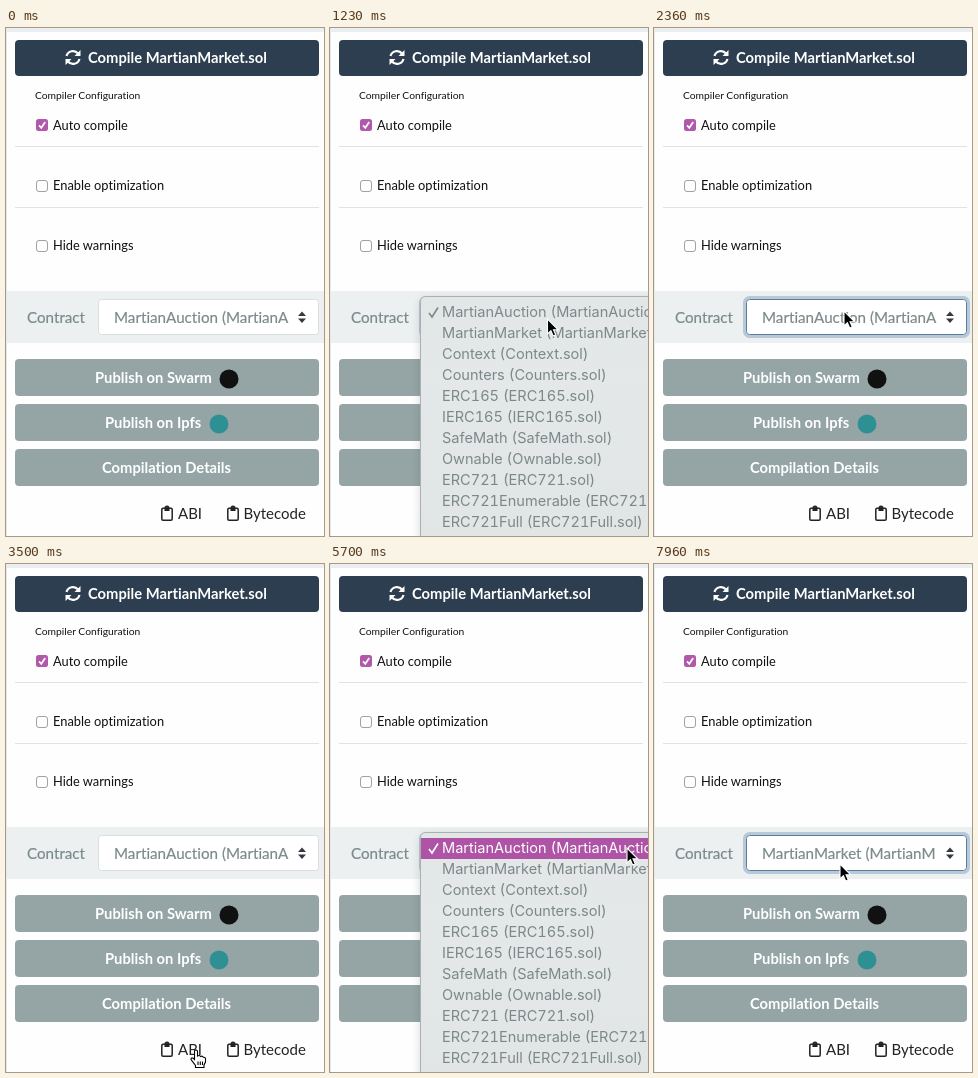
Animation, 318 px wide and 508 px high, one loop 8000 ms. Source, as an HTML page:

```html
<!DOCTYPE html>
<html lang="en">
<head>
<meta charset="utf-8">
<style>
html, body { margin: 0; width: 100%; height: 100%; overflow: hidden; background: #fefefe; }
svg { display: block; width: 318px; height: 508px; font: 15px Lato, sans-serif; font-variant-ligatures: none; }
.btn { fill: #95a5a6; }
.white { fill: #fff; font-weight: bold; font-size: 14.75px; }
.small { font-size: 12.85px; fill: #111; }
.grey { fill: #7b8a8b; font-size: 15.2px; stroke: #7b8a8b; stroke-width: .2; }
.dark { fill: #222; }
.box { fill: #fff; stroke: #a0a0a0; }
.line { fill: none; stroke: #222; stroke-width: 1.5; }
#menu text { font: 14.55px Inter, sans-serif; font-variant-numeric: tabular-nums; fill: #7c8889; }
#menu text.on { fill: #fff; }
</style>
</head>
<body>
<svg viewBox="0 0 318 508">
  <defs>
    <linearGradient id="glass" x2="0" y2="1">
      <stop stop-color="#e3e6e7"/><stop offset=".25" stop-color="#e4e8e8"/><stop offset="1" stop-color="#e2e4e4"/>
    </linearGradient>
    <filter id="shadow"><feDropShadow dx="0" dy="3" stdDeviation="4" flood-opacity=".15"/></filter>
    <g id="clip" class="line">
      <rect x=".8" y="2.8" width="10.4" height="12" rx="1.2"/>
      <path d="M3.5 4.5h5M4.5 2.5a1.5 1.5 0 0 1 3 0" stroke-width="2"/>
    </g>
  </defs>

  <path d="M0 0H318V4H0Z" fill="#eceff1"/>
  <path d="M.5 0V508" stroke="#e6e9eb"/>
  <rect x="9" y="12" width="304" height="36" rx="4" fill="#2c3e50"/>
  <path d="M60.5 28A6.6 6.6 0 0 1 72 25.5M73.5 31A6.6 6.6 0 0 1 62 33.5" fill="none" stroke="#fff" stroke-width="2.200"/>
  <path d="M74.500 22V28H68.500ZM59.500 37V31H65.500Z" fill="#fff"/>
  <text class="white" x="82" y="35">Compile MartianMarket.sol</text>
  <text x="29" y="71" font-size="10.3" fill="#111">Compiler Configuration</text>

  <rect x="30" y="91" width="12" height="12" rx="2.5" fill="#b258aa"/>
  <path d="M33 97.300L35.300 99.800L39.200 94" fill="none" stroke="#fff" stroke-width="1.7"/>
  <rect class="box" x="30.500" y="152.500" width="11" height="11" rx="2.5"/>
  <rect class="box" x="30.500" y="212.500" width="11" height="11" rx="2.5"/>
  <text class="small" x="47" y="102">Auto compile</text>
  <text class="small" x="47" y="162">Enable optimization</text>
  <text class="small" x="47" y="222">Hide warnings</text>
  <path d="M9 118.500H313M9 179.500H313" stroke="#e2e2e2"/>

  <rect x="1" y="263" width="317" height="52" fill="#ecf0f1"/>
  <text class="grey" x="21" y="295">Contract</text>
  <rect id="ring" x="90.500" y="269.500" width="224" height="39" rx="5" fill="none" stroke="#b9c8d6" stroke-width="3"/>
  <rect id="field" x="92.500" y="271.500" width="220" height="35" rx="3" fill="#fff"/>
  <text id="value" class="grey" x="108" y="295"></text>
  <path d="M292 288L296 283.500L300 288ZM292 290.500L296 295L300 290.500Z" fill="#343a40"/>

  <rect class="btn" x="9" y="331" width="304" height="37" rx="4"/>
  <rect class="btn" x="9" y="376" width="304" height="37" rx="4"/>
  <rect class="btn" x="9" y="421" width="304" height="37" rx="4"/>
  <text class="white" x="89" y="355">Publish on Swarm</text>
  <text class="white" x="99" y="400">Publish on Ipfs</text>
  <text class="white" x="96" y="445">Compilation Details</text>
  <circle cx="223" cy="351" r="9.500" fill="#111"/>
  <circle cx="213" cy="396" r="9.500" fill="#2f9094"/>

  <use href="#clip" x="155" y="477.500"/>
  <use href="#clip" x="221" y="477.500"/>
  <text class="dark" x="172" y="491">ABI</text>
  <text class="dark" x="237.500" y="491">Bytecode</text>

  <g id="menu">
    <rect x="90.500" y="268.500" width="300" height="300" rx="5" fill="url(#glass)" stroke="#a9b0b2" filter="url(#shadow)"/>
    <rect id="bar" x="91" width="227" height="21" fill="#ae53a6"/>
    <path id="tick" d="M99 285L102 289L108 279.500" fill="none" stroke-width="1.6"/>
  </g>

  <path id="arrow" d="M0 0V15L3.400 11.800L5.700 17L8.200 15.900L6 10.800H10.700Z" stroke="#fff" stroke-width="1.100"/>
  <path id="hand" d="M-1.500 1Q0-1 1.500 1V6Q3.500 4.800 4.500 6.500Q6.500 5.500 7.300 7.300Q9.500 7 9.500 9V12L8 15V17.500H-.5V15.500L-5 9.500Q-5 7-2.700 8.300L-1.500 9.500ZM2 11.500V15M4.300 11.500V15M6.500 11.500V15" fill="#fff" stroke="#000" stroke-width="1.100"/>
</svg>
<script>
const LOOP = 8000, ROW = 21;
const items = ["MartianAuction (MartianAuction.sol)", "MartianMarket (MartianMarket.sol)",
  "Context (Context.sol)", "Counters (Counters.sol)", "ERC165 (ERC165.sol)", "IERC165 (IERC165.sol)",
  "SafeMath (SafeMath.sol)", "Ownable (Ownable.sol)", "ERC721 (ERC721.sol)",
  "ERC721Enumerable (ERC721Enumerable.sol)", "ERC721Full (ERC721Full.sol)"];
// time, x, y of the pointer tip
const route = [[760, 330, 335], [1080, 217.5, 291], [1350, 217.5, 291], [1800, 190, 283], [2500, 190, 283],
  [3050, 190, 486], [4290, 190, 486], [4430, 121, 440], [4800, 180, 320], [5350, 297, 284], [6350, 297, 284],
  [6950, 189, 304], [7600, 189, 304], [7900, 186, 300], [8000, 186, 300]];
// time, menu open, highlighted row, focus ring
const states = [[0, 0, -1, 0], [1180, 1, -1, 1], [1350, 1, 0, 1], [1960, 0, -1, 1], [3150, 0, -1, 0],
  [5560, 1, 0, 1], [6700, 1, 1, 1], [7500, 0, -1, 1]];

const $ = id => document.getElementById(id);
const show = (el, on) => el.style.display = on ? "" : "none";
const rows = items.map((name, i) => {
  const row = document.createElementNS("http://www.w3.org/2000/svg", "text");
  row.textContent = name;
  row.setAttribute("x", 112);
  row.setAttribute("y", 289 + i * ROW);
  return $("menu").appendChild(row);
});

function tip(t) {
  const i = route.findIndex(p => p[0] > t);
  if (i < 1) return [400, 400];
  const [a, b] = [route[i - 1], route[i]];
  const u = (t - a[0]) / (b[0] - a[0]), e = u * u * (3 - 2 * u);
  return [a[1] + (b[1] - a[1]) * e, a[2] + (b[2] - a[2]) * e];
}

function draw(t) {
  const [, open, lit, focus] = states.filter(s => s[0] <= t).pop();
  const [x, y] = tip(t);
  const link = x > 152 && x < 200 && y > 475 && y < 497;
  show($("menu"), open);
  show($("ring"), focus);
  $("field").setAttribute("stroke", focus ? "#597ea2" : "#d9dee1");
  $("value").textContent = t < 7500 ? "MartianAuction (MartianA" : "MartianMarket (MartianM";
  show($("bar"), lit >= 0);
  $("bar").setAttribute("y", 274 + lit * ROW);
  $("tick").setAttribute("stroke", lit ? "#7c8889" : "#fff");
  rows.forEach((row, i) => row.classList.toggle("on", i === lit));
  show($("arrow"), !link);
  show($("hand"), link);
  for (const id of ["arrow", "hand"]) $(id).setAttribute("transform", `translate(${x} ${y})`);
}

function tick() {
  draw(performance.now() % LOOP);
  requestAnimationFrame(tick);
}
tick();
</script>
</body>
</html>
```
